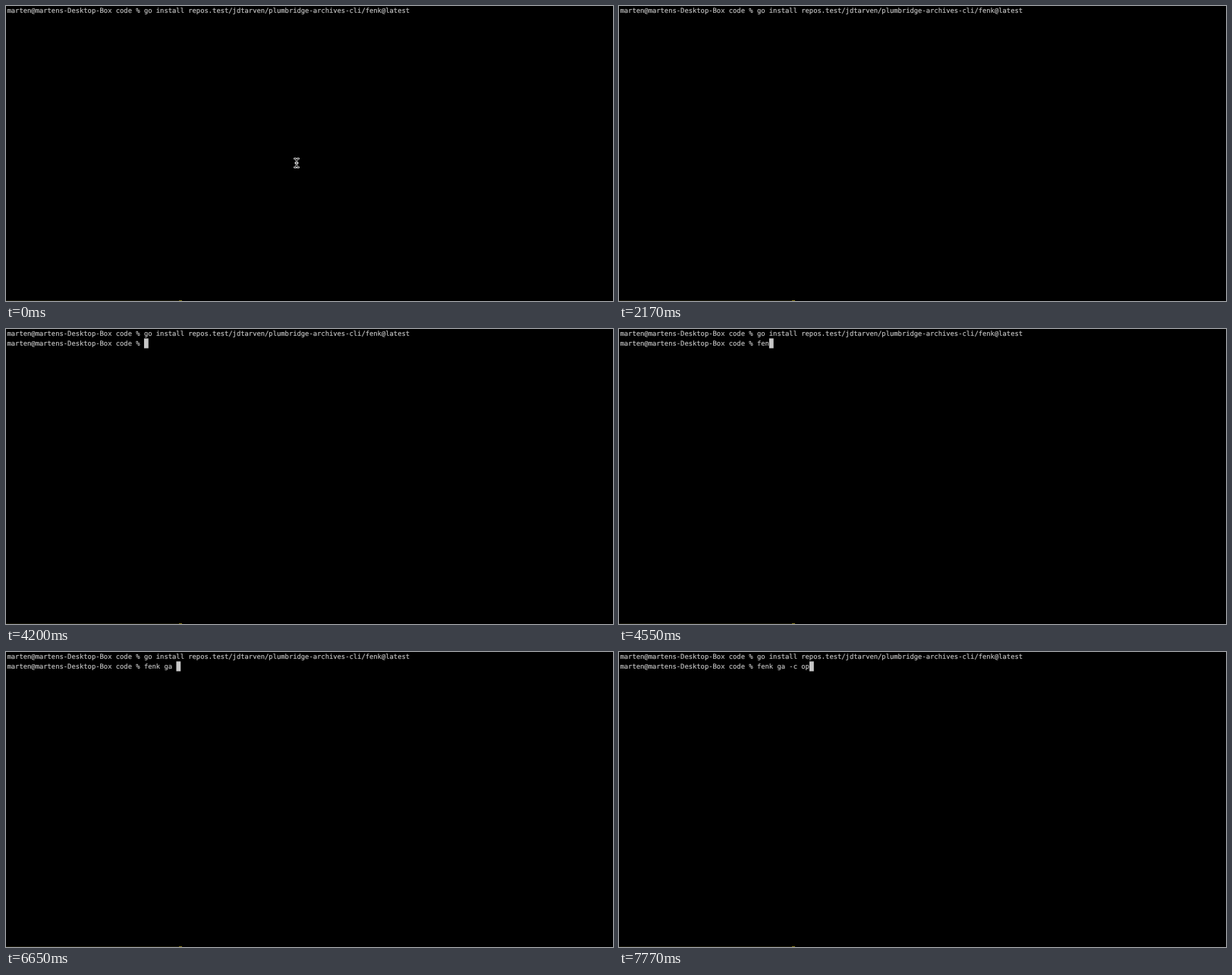
Recreate the animation shown at these times as an HTML page. Size 800 px wide and 389 px high, loop 8 s.

```html
<!DOCTYPE html>
<html lang="en">
<head>
<meta charset="utf-8">
<title>Terminal</title>
<style>
  html, body { margin: 0; width: 100%; height: 100%; overflow: hidden; background: #000; }
  svg { display: block; width: 100%; height: 100%; }
  text {
    font: 8.82px "DejaVu Sans Mono", monospace;
    fill: #c7c7c7;
    stroke: #c7c7c7;
    stroke-width: .15px;
    white-space: pre;
    text-rendering: geometricPrecision;
  }
</style>
</head>
<body>
<svg viewBox="0 0 800 389">
  <rect y="388" width="232" height="1" fill="#1a190b"/>
  <rect x="228" y="388" width="4" height="1" fill="#84791f"/>
  <text id="first" x="1.5" y="9.3"></text>
  <text id="second" x="1.5" y="22.2"></text>
  <rect id="cursor" width="5.8" height="13" fill="#c7c7c7"/>
  <g id="pointer" fill="none" stroke-linecap="round">
    <path id="beam" d="M380.4 201.2Q383 201.2 383 203.5V210.5Q383 212.8 380.4 212.8M385.6 201.2Q383 201.2 383 203.5M383 210.5Q383 212.8 385.6 212.8M381.8 207H384.2" stroke="#eee" stroke-width="2.6"/>
    <path d="M380.4 201.2Q383 201.2 383 203.5V210.5Q383 212.8 380.4 212.8M385.6 201.2Q383 201.2 383 203.5M383 210.5Q383 212.8 385.6 212.8" stroke="#000" stroke-width=".9"/>
  </g>
</svg>
<script>
const LOOP = 8000, CELL = 5.31, ROW = 12.9;
const prompt = 'marten@martens-Desktop-Box code % ';
const install = prompt + 'go install repos.test/jdtarven/plumbridge-archives-cli/fenk@latest';
const typed = 'fenk ga -c op';

// [time, second line, cursor row, cursor visible]
const steps = [
  [0, '', 0, false],
  [490, '', 0, true],
  [980, '', 1, true],
  [2100, '', 1, false],
  [2590, '', 1, true],
  [3150, '', 1, false],
  [3360, prompt, 1, true]
];
const keyTimes = [4270, 4410, 4550, 4690, 4900, 5670, 6090, 6650, 6860, 7000, 7350, 7700, 7770];
keyTimes.forEach((time, i) => steps.push([time, prompt + typed.slice(0, i + 1), 1, true]));

const el = id => document.getElementById(id);
const second = el('second'), cursor = el('cursor'), pointer = el('pointer');
el('first').textContent = install;

const start = performance.now();
function draw() {
  const t = (performance.now() - start) % LOOP;
  const [, line, row, visible] = steps.findLast(step => step[0] <= t);
  second.textContent = line;
  cursor.setAttribute('x', 1.4 + CELL * (row ? line : install).length);
  cursor.setAttribute('y', ROW * row - .5);
  cursor.style.display = visible ? '' : 'none';
  pointer.style.display = row ? 'none' : '';
  requestAnimationFrame(draw);
}
draw();
</script>
</body>
</html>
```
